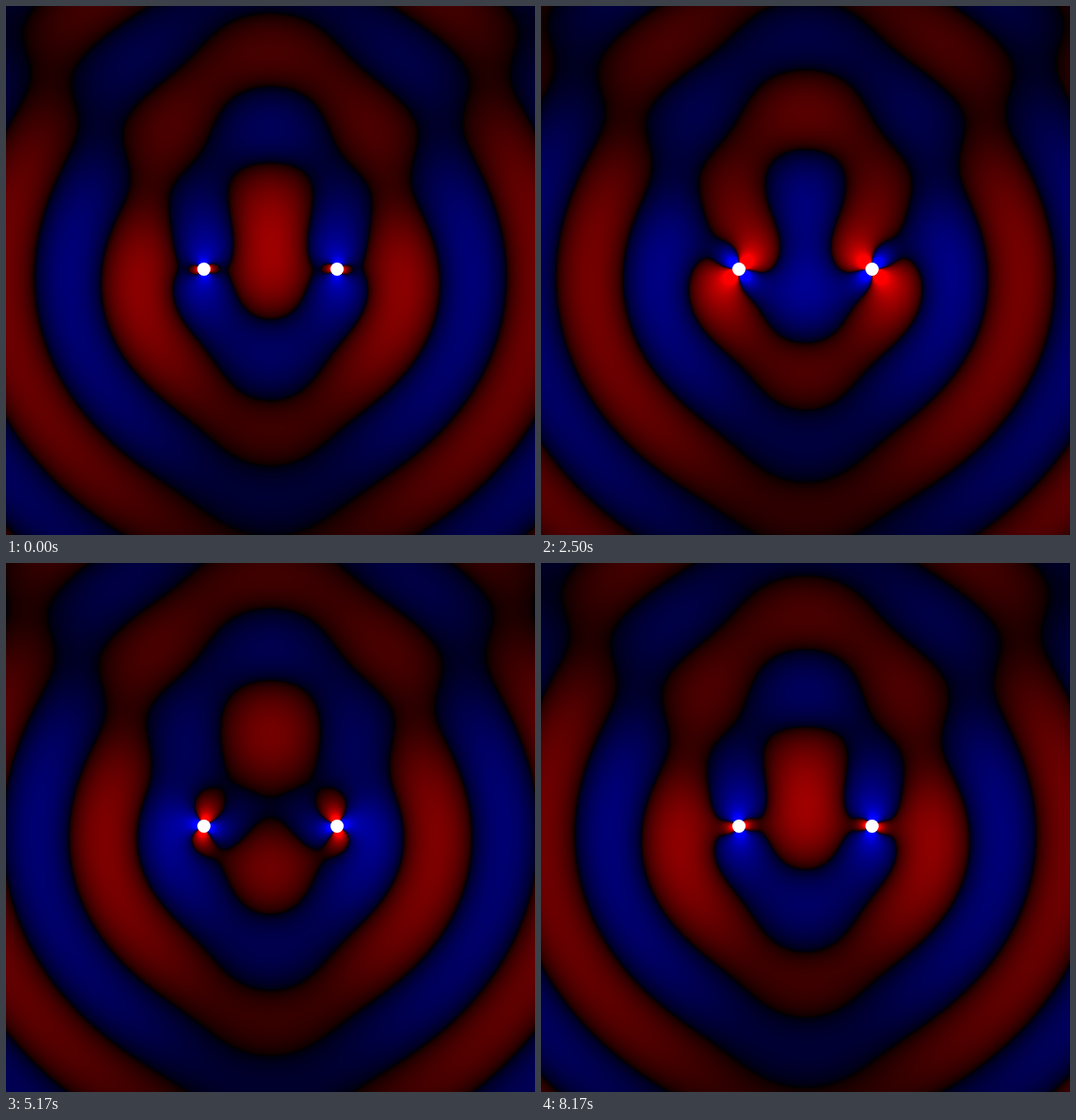
These frames come from a looping animation (600 px wide and 600 px high, 8.34 s). An HTML page with a canvas:

```html
<!DOCTYPE html>
<html lang="en">
<head>
<meta charset="utf-8">
<title>Two counter-rotating dipoles</title>
<style>
  html, body { margin: 0; width: 100%; height: 100%; overflow: hidden; background: #000; }
  canvas { display: block; width: 600px; height: 600px; }
</style>
</head>
<body>
<canvas id="stage" width="600" height="600"></canvas>
<script>
const SIZE = 600;
const SOURCE_X = 224.5, SOURCE_Y = 298.5, DOT_RADIUS = 7.5;
const WAVENUMBER = 2 * Math.PI / 150;
const STEPS = 50, STEPS_PER_WAVE = 25, LOOP_MS = 8340;
const START_PHASE = 2.65, GAIN = 161;

const ctx = document.getElementById('stage').getContext('2d');
const image = ctx.createImageData(SIZE, SIZE);
const pixels = image.data;

// Hankel functions of order 0 and 2, from the power series of J0 and Y0
function hankel(x) {
  const q = x * x / 4;
  let term = 1, harmonic = 0, j = 0, dj = 0, s = 0, ds = 0;
  for (let m = 0; m < 60; m++) {
    const slope = 2 * m * term / x;
    j += term;
    dj += slope;
    s -= harmonic * term;
    ds -= harmonic * slope;
    term *= -q / ((m + 1) * (m + 1));
    harmonic += 1 / (m + 1);
  }
  const log = Math.log(x / 2) + 0.5772156649;
  const y = 2 / Math.PI * (log * j + s);
  const dy = 2 / Math.PI * (j / x + log * dj + ds);
  return [j, y, -2 * dj / x - j, -2 * dy / x - y];
}

// Vertical field of one rotating dipole, (H0 - H2 exp(-2i angle)) / 2,
// and of the static horizontal dipole left behind when it was switched on
function dipole(dx, dy) {
  const r = Math.max(Math.hypot(dx, dy), 0.5), u = WAVENUMBER * r;
  const c = (dx * dx - dy * dy) / (r * r);
  const s = 2 * dx * dy / (r * r);
  const [j0, y0, j2, y2] = hankel(u);
  return [
    (j0 - j2 * c - y2 * s) / 2,
    (y0 - y2 * c + j2 * s) / 2,
    2 * s / (Math.PI * u * u)
  ];
}

const newField = () => new Float32Array(SIZE * SIZE);
const real = newField(), imag = newField(), fixed = newField();

// The second dipole is the mirror image of the first
for (let y = 0; y < SIZE; y++) {
  for (let x = 0; x < SIZE; x++) {
    const [re, im, still] = dipole(x + 0.5 - SOURCE_X, SOURCE_Y - y - 0.5);
    for (const column of [x, SIZE - 1 - x]) {
      const i = y * SIZE + column;
      real[i] += re;
      imag[i] += im;
      fixed[i] += still;
    }
  }
}

function dot(x) {
  ctx.beginPath();
  ctx.arc(x, SOURCE_Y, DOT_RADIUS, 0, 2 * Math.PI);
  ctx.fill();
}

function draw(step) {
  const phase = START_PHASE + 2 * Math.PI * step / STEPS_PER_WAVE;
  const c = Math.cos(phase), s = Math.sin(phase);
  for (let i = 0, p = 0; i < real.length; i++, p += 4) {
    const field = real[i] * c + imag[i] * s + fixed[i];
    const level = GAIN * Math.sqrt(Math.abs(field));
    pixels[p] = field > 0 ? level : 0;
    pixels[p + 2] = field < 0 ? level : 0;
    pixels[p + 3] = 255;
  }
  ctx.putImageData(image, 0, 0);
  ctx.fillStyle = '#fff';
  dot(SOURCE_X);
  dot(SIZE - SOURCE_X);
}

// Six steps a second, rounded to hundredths of a second
const startOf = step => Math.round(step * 100 / 6) * 10;

function stepAt(time) {
  let step = 0;
  while (step < STEPS - 1 && startOf(step + 1) <= time) step++;
  return step;
}

let shown = 0;
draw(shown);
const begin = performance.now();

function tick() {
  const step = stepAt((performance.now() - begin) % LOOP_MS);
  if (step !== shown) draw(shown = step);
  requestAnimationFrame(tick);
}
requestAnimationFrame(tick);
</script>
</body>
</html>
```
